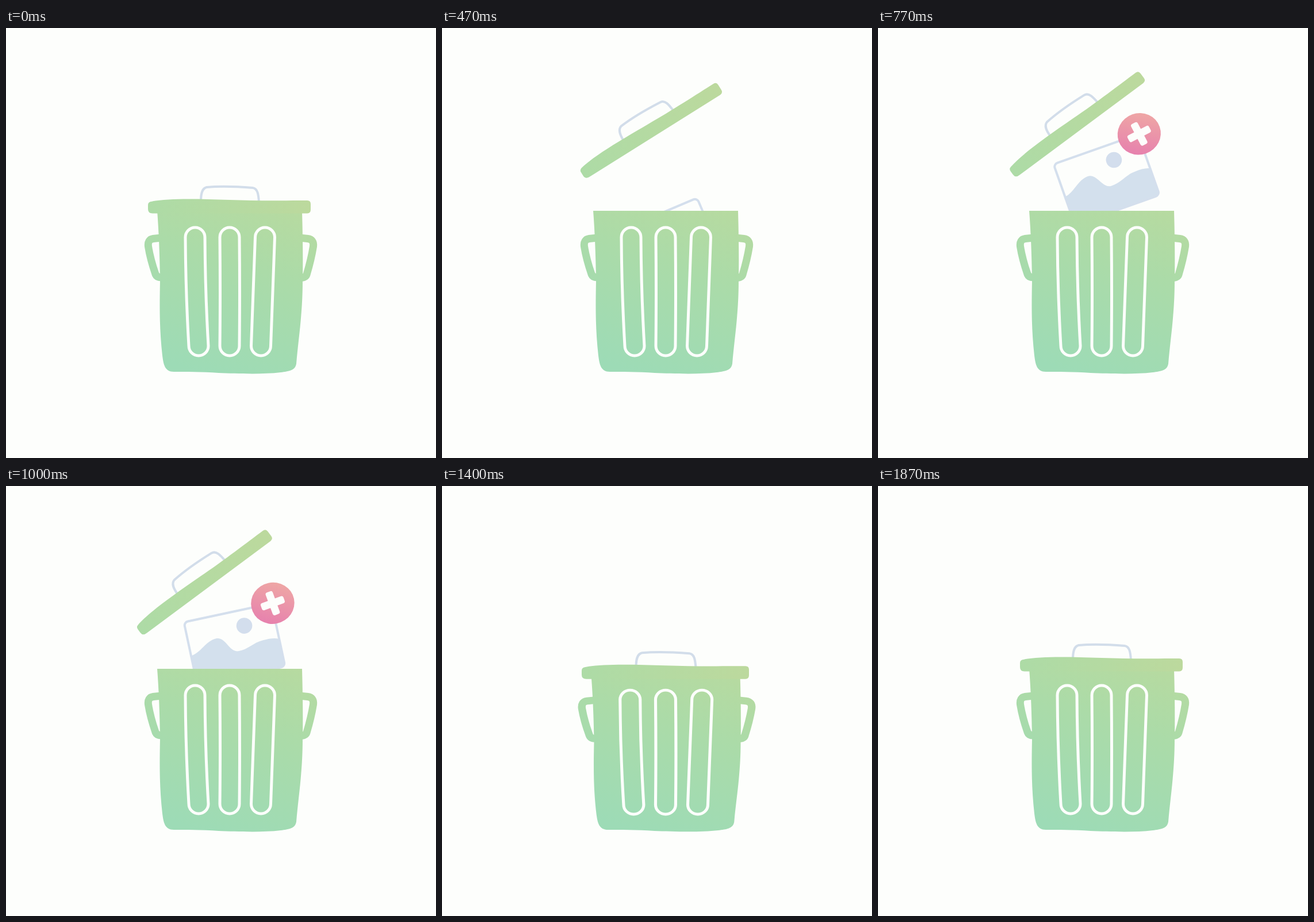
Recreate the animation shown at these times as an HTML page. Size 748x748 px, loop 1.91 s.

```html
<!DOCTYPE html>
<html lang="en">
<head>
<meta charset="utf-8">
<title>Trash can</title>
<style>
  html, body { margin: 0; height: 100%; overflow: hidden; background: #fdfefc; }
  svg { display: block; width: 100vw; height: 100vh; }
</style>
</head>
<body>
<svg viewBox="0 0 748 748">
  <defs>
    <linearGradient id="green" gradientUnits="userSpaceOnUse" x1="475" y1="290" x2="370" y2="610">
      <stop offset="0" stop-color="#b8da9f"/>
      <stop offset=".4" stop-color="#abdba8"/>
      <stop offset="1" stop-color="#9ddbb6"/>
    </linearGradient>
    <linearGradient id="lidGreen">
      <stop offset="0" stop-color="#addba6"/>
      <stop offset="1" stop-color="#bcd99d"/>
    </linearGradient>
    <linearGradient id="pink" x1=".25" y1="1" x2=".8" y2="0">
      <stop offset="0" stop-color="#e67fae"/>
      <stop offset="1" stop-color="#efa9a4"/>
    </linearGradient>
  </defs>

  <g id="photo">
    <rect width="156" height="112" rx="7" fill="#fdfefc"/>
    <path d="M0 60C18 58 30 40 49 39.500C66 40 66 68 82 69C100 70 110 60 128 59.500Q146 58 156 63V102Q156 112 146 112H10Q0 112 0 102Z" fill="#d3e0ed"/>
    <circle cx="101.500" cy="28" r="13.800" fill="#d3deed"/>
    <rect width="156" height="112" rx="7" fill="none" stroke="#d4dfed" stroke-width="4"/>
    <g id="badge">
      <ellipse rx="37.800" ry="36" fill="url(#pink)"/>
      <g fill="#fdfefc" transform="rotate(-8)">
        <rect x="-21" y="-6.500" width="42" height="13" rx="3.500"/>
        <rect x="-6.500" y="-21" width="13" height="42" rx="3.500"/>
      </g>
    </g>
  </g>

  <g id="bin">
    <path fill="url(#green)" d="M263 318H515Q517 390 516 440C516 500 508 545 505 584C503 596 492 597 478 599C445 603 400 601 370 600C340 598 312 598 292 598C276 598 274 585 272 570C267 525 267 490 268 440Q267 370 263 318Z"/>
    <g fill="none" stroke="url(#green)" stroke-width="13">
      <path d="M270 365L256 366.500Q246 368 247.500 380Q251 402 260 428Q262 434 270 434"/>
      <path d="M511 365L525 366.500Q536 368 534.500 380Q531 402 523 429Q521 434.500 511 434.500"/>
    </g>
    <path id="slots" fill="none" stroke="#fdfefc" stroke-width="5"/>
  </g>

  <g id="lid">
    <path d="M339 301C339 288 341 279 349 277C375 274.500 405 276 429 278C438 279 439 290 440 302" fill="none" stroke="#d2ddea" stroke-width="4"/>
    <path d="M252 302C280 296 330 297 389 299C440 301 490 300 524 300Q530 300 530 306V316Q530 322 524 322.500H256Q247 323 247 315V308Q247 303 252 302Z" fill="url(#lidGreen)"/>
  </g>
</svg>
<script>
const LOOP = 1910, OPEN = 300, SHUT = 1350;
const [photo, badge, bin, slots, lid] =
  ['photo', 'badge', 'bin', 'slots', 'lid'].map(id => document.getElementById(id));

// A long pill from one centre line to another; bend bows both sides
function slot(top, bottom, bend) {
  const r = 17, mid = (top + bottom) / 2 + bend;
  return `M${top - r} 364a${r} ${r} 0 0 1 ${2 * r} 0Q${mid + r} 460 ${bottom + r} 553` +
    `a${r} ${r} 0 0 1 ${-2 * r} 0Q${mid - r} 460 ${top - r} 364Z`;
}
slots.setAttribute('d', slot(329, 335, -2.5) + slot(389, 389, 1) + slot(450.5, 443.5, 0));

const progress = (t, from, to) => Math.min(1, Math.max(0, (t - from) / (to - from)));
const easeOut = (t, from, to) => 1 - (1 - progress(t, from, to)) ** 3;
const easeIn = (t, from, to) => progress(t, from, to) ** 3;

// Rises to 1 between the first two times, then falls back by SHUT
const swing = (t, start, full, leave) => easeOut(t, start, full) - easeIn(t, leave, SHUT);

// Crouch before opening, damped wobble after closing
function squash(t) {
  if (t < SHUT) return .084 * Math.sin(Math.PI * progress(t, 30, OPEN));
  const s = t - SHUT;
  return .05 * Math.exp(-s / 90) * Math.sin(Math.PI * s / 100);
}

const place = (node, value) => node.setAttribute('transform', value);

function draw(t) {
  const k = squash(t);
  place(bin, `translate(391 600) scale(${1 + k} ${1 - 1.13 * k}) translate(-391 -600)`);

  const lidX = 389 - 44 * swing(t, OPEN, 990, 944);
  const lidY = 311 - 144 * swing(t, OPEN, 598, 1067) + 465 * k;
  const lidTurn = -36.6 * swing(t, OPEN, 640, 1095);
  place(lid, `translate(${lidX} ${lidY}) rotate(${lidTurn}) scale(${1 + k} 1) translate(-389 -311)`);

  const drift = (Math.min(t, SHUT) - 470) / 730;
  const photoY = 430 - 193 * swing(t, 430, 708, 1042);
  place(photo, `translate(${300 + 13 * drift} ${photoY}) rotate(${20.6 * drift ** 2 - 23})`);
  place(badge, `translate(158 0) scale(${easeOut(t, 490, 680)})`);
}

const start = performance.now();
function tick() {
  draw((performance.now() - start) % LOOP);
  requestAnimationFrame(tick);
}
tick();
</script>
</body>
</html>
```
